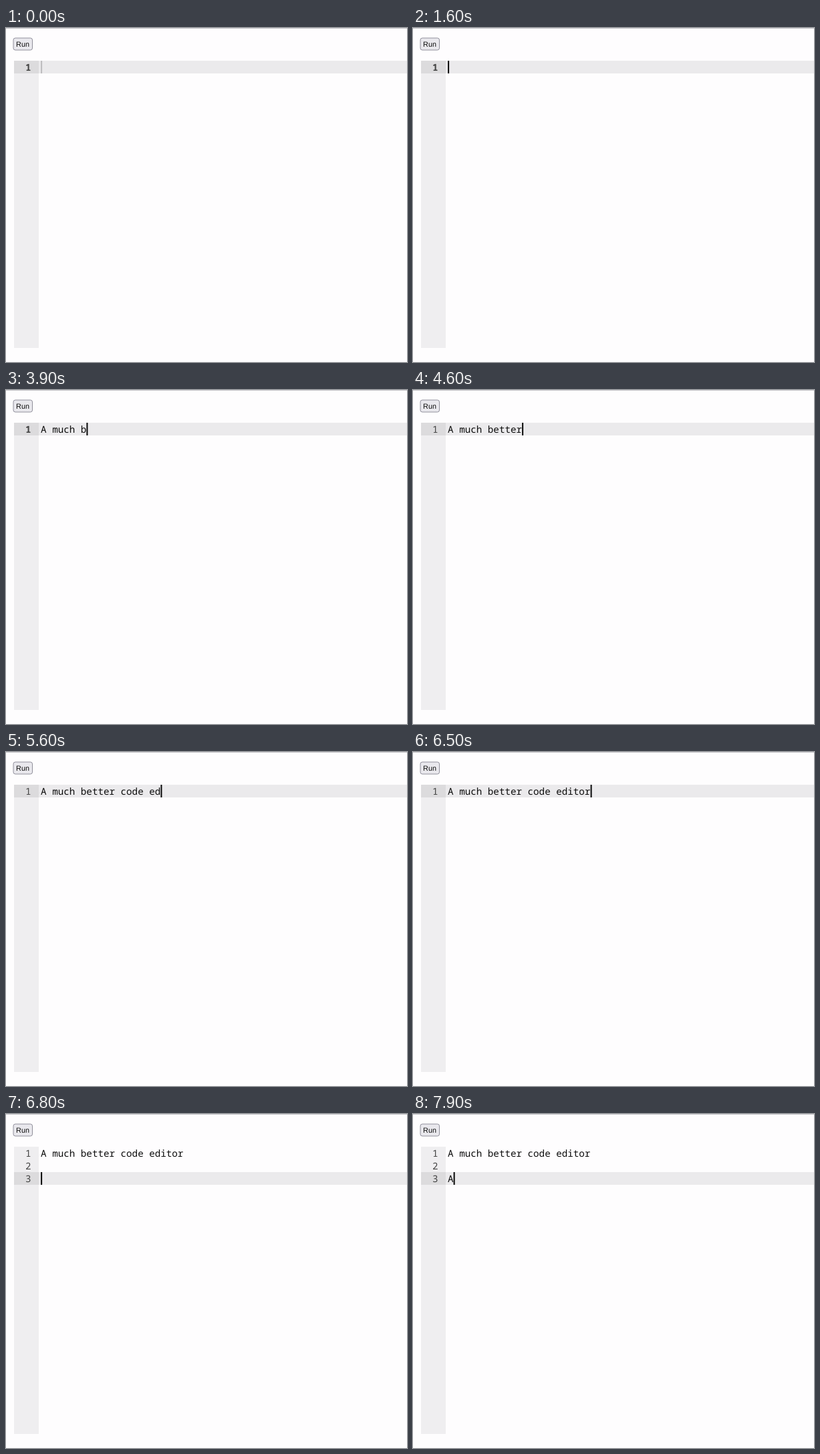
An HTML page that plays this animation: 600x500 px, repeating every 8 s.

```html
<!DOCTYPE html>
<html lang="en">
<head>
<meta charset="utf-8">
<title>Code editor</title>
<style>
  html, body { margin: 0; width: 100%; height: 100%; overflow: hidden; background: #fefdfe; }
  svg { display: block; width: 600px; height: 500px; }
  text { white-space: pre; text-rendering: geometricPrecision; }
  .code { font: 14.23px "Noto Sans Mono", monospace; fill: #0c0c0c; }
  .num { font: 14.2px "Noto Sans Mono", monospace; fill: #444; text-anchor: middle; }
  .label { font: 10.8px "Liberation Sans", Arial, sans-serif; fill: #0c0c0c; text-anchor: middle; }
</style>
</head>
<body>
<svg viewBox="0 0 600 500">
  <rect width="600" height="500" fill="#fefdfe"/>
  <rect width="600" height="1" fill="#c6c5c9"/>
  <rect x="11" y="15" width="28.5" height="18" rx="3" fill="#e9e8ed" stroke="#908f9b"/>
  <text class="label" x="25" y="28">Run</text>
  <rect x="12" y="49" width="37" height="430" fill="#efeef0"/>
  <g id="active">
    <rect x="12" y="49" width="37" height="19" fill="#dcdbdd"/>
    <rect x="49" y="49" width="551" height="19" fill="#ebeaec"/>
  </g>
  <g id="nums"></g>
  <g id="lines"></g>
  <rect id="caret" width="2" height="19"/>
  <path id="beam" d="M-3-8h2l1 1l1-1h2M0-7V7M-3 8h2l1-1l1 1h2" fill="none" stroke="#111"/>
</svg>
<script>
const LOOP = 8000, STEP = 100;
const TOP = 49, ROW = 19, LEFT = 52.1, CHAR = 8.54;
const TITLE = "A much better code editor";

const FOCUS = 600, ENTER1 = 6600, ENTER2 = 6800, LAST_KEY = 7900;
const BLINK = 1000, BLINK_ON = 600;

// [time, value...] key points
const typing = [[2800, 0], [3000, 2], [3200, 2], [4000, 9], [4600, 13],
                [5000, 16], [5600, 21], [5900, 23], [6200, 25]];
const pointer = [[400, 586, 326], [600, 440, 225], [900, 400, 195],
                 [1000, 400, 195], [1100, 592, 195]];

const $ = id => document.getElementById(id);

function addText(parent, cls, x, row) {
  const el = document.createElementNS("http://www.w3.org/2000/svg", "text");
  el.setAttribute("class", cls);
  el.setAttribute("x", x);
  el.setAttribute("y", TOP + row * ROW + 15);
  return parent.appendChild(el);
}

const rows = [0, 1, 2];
const nums = rows.map(r => addText($("nums"), "num", 33.3, r));
const lines = rows.map(r => addText($("lines"), "code", LEFT, r));

function at(keys, t, i) {
  if (t <= keys[0][0]) return keys[0][i];
  for (let k = 1; k < keys.length; k++) {
    const a = keys[k - 1], b = keys[k];
    if (t <= b[0]) return a[i] + (b[i] - a[i]) * (t - a[0]) / (b[0] - a[0]);
  }
  return keys[keys.length - 1][i];
}

const typed = t => Math.floor(at(typing, t, 1) + 1e-6);

// Blinking restarts at the latest key press or click
function lastInput(t) {
  for (let s = t; s > FOCUS; s -= STEP) {
    if (s === ENTER1 || s === ENTER2 || s === LAST_KEY || typed(s) !== typed(s - STEP)) return s;
  }
  return FOCUS;
}

function draw(time) {
  const t = Math.floor(time % LOOP / STEP) * STEP;
  const row = t >= ENTER2 ? 2 : t >= ENTER1 ? 1 : 0;
  const texts = [TITLE.slice(0, typed(t)), "", t >= LAST_KEY ? "A" : ""];

  rows.forEach(r => {
    lines[r].textContent = texts[r];
    nums[r].textContent = r <= row ? r + 1 : "";
  });
  nums[0].style.fontWeight = t < 4200 ? 600 : 400;
  $("active").setAttribute("transform", `translate(0 ${row * ROW})`);

  const focused = t >= FOCUS;
  const shown = !focused || (t - lastInput(t)) % BLINK < BLINK_ON;
  const caret = $("caret");
  caret.setAttribute("x", LEFT + texts[row].length * CHAR);
  caret.setAttribute("y", TOP + row * ROW);
  caret.setAttribute("fill", focused ? "#080808" : "#bdbcbe");
  caret.setAttribute("visibility", shown ? "visible" : "hidden");

  const moving = t >= 400 && t < 1200;
  $("beam").setAttribute("visibility", moving ? "visible" : "hidden");
  $("beam").setAttribute("transform",
    `translate(${Math.round(at(pointer, t, 1)) + 0.5} ${Math.round(at(pointer, t, 2))})`);
}

let start;
function tick(now) {
  if (start === undefined) start = now;
  draw(now - start);
  requestAnimationFrame(tick);
}
draw(0);
requestAnimationFrame(tick);
</script>
</body>
</html>
```
